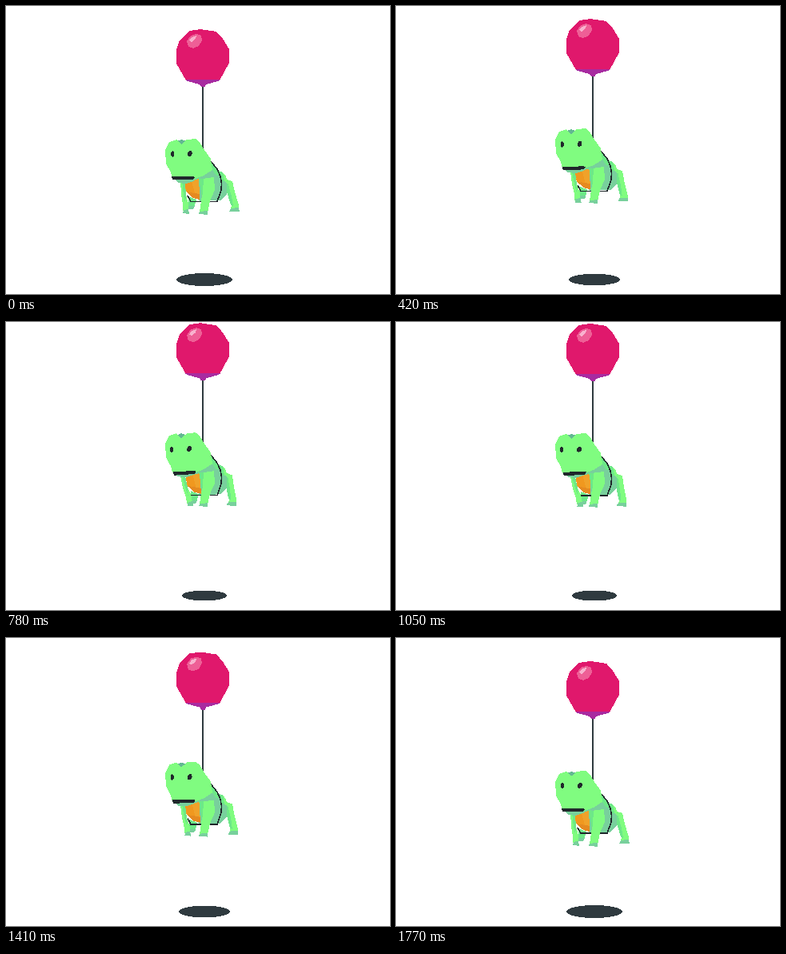
These frames come from a looping animation (480x360 px, 1.8 s). An HTML page:

```html
<!DOCTYPE html>
<html lang="en">
<head>
<meta charset="utf-8">
<title>Floating frog</title>
<style>
  html, body { margin: 0; width: 100%; height: 100%; overflow: hidden; background: #fff; }
  svg { display: block; width: 480px; height: 360px; --q: 0; }
  g, ellipse { transform-box: view-box; }

  /* --q runs from 0 (lowest) to 1 (highest) */
  .float { transform: translateY(calc(var(--q) * -29px)); }
  .shadow { transform-origin: 248px 342px; transform: scale(calc(1 - var(--q) * .207)); }
  .eyes { transform: translate(calc(var(--q) * -.9px), calc(var(--q) * 2px)); }
  .mouth { transform-origin: 221px 215px;
    transform: translate(calc(var(--q) * 2px), calc(var(--q) * 1.4px)) rotate(calc(var(--q) * -3deg)); }
  .chest { transform: translate(calc(var(--q) * 1.6px), calc(var(--q) * .5px)); }
  .fore-far { transform-origin: 222px 222px;
    transform: translateY(calc(var(--q) * -1px)) rotate(calc(var(--q) * -9deg)); }
  .fore-near { transform-origin: 250px 214px; transform: scaleY(calc(1 - var(--q) * .05)); }
  .hind-near { transform-origin: 279px 219px; transform: rotate(calc(var(--q) * 5.5deg)); }
  .hind-far { transform: translate(calc(var(--q) * 3px), calc(var(--q) * 1px)); }

  .lit { fill: #80fc80; }
  .mid { fill: #6de888; }
  .dim { fill: #78d09c; }
  .deep { fill: #62b892; }
  .ink { fill: #20282b; }
  .strap { fill: none; stroke: #20282b; stroke-width: 1.6; }
  .string { stroke: #2f3a3f; stroke-width: 2; }
</style>
</head>
<body>
<svg id="stage" viewBox="0 0 480 360" shape-rendering="crispEdges">
  <ellipse class="shadow" cx="248" cy="342" rx="35" ry="8" fill="#2f3a3f"/>
  <g class="float">
    <path class="string" d="M246 99V178"/>

    <g class="balloon">
      <path fill="#e0186c" d="M229 31L243 29 263 32 271 41 279 54 279 71 267 93 225 93 213 72 213 55 217 43Z"/>
      <path fill="#a82ba0" d="M224 92L268 92 265 94 250 98 249 101 244 101 242 98 227 94Z"/>
      <path fill="#ee5f96" d="M226 44L231 37 238 35 244 37 245 43 241 50 234 53 228 51Z"/>
      <path fill="#f8b2ce" d="M229 43L232 39 238 37 237 41 232 45Z"/>
    </g>

    <g class="hind-far">
      <path class="mid" d="M228 238L238 242 235 253 227 253Z"/>
      <path class="dim" d="M228 250L236 250 234 254 226 254Z"/>
    </g>

    <g class="hind-near">
      <path class="lit" d="M273 216L283 219 286 232 291 249 291 255 281 255 282 247 276 231Z"/>
      <path class="mid" d="M273 216L277 220 282 238 284 250 281 249 276 232Z"/>
      <path class="dim" d="M281 253L291 252 292 257 279 257Z"/>
    </g>

    <g class="body">
      <path class="dim" d="M250 190L256 194 266 206 271 208 276 217 276 235 268 243 242 244 236 236 226 230 224 218Z"/>
      <path class="mid" d="M256 194L263 202 267 212 258 211 246 211Z"/>
      <path class="mid" d="M266 206L271 208 276 217 270 220Z"/>
      <path class="lit" d="M271 208L275 213 277 222 273 219Z"/>
      <path class="strap" d="M256 194L264 204 268 213 269.5 222 269 230 264 244.3 231 244.3 227 237"/>
    </g>

    <g class="chest">
      <path fill="#f0a22a" d="M223 221L241 216 242 236 225 232Z"/>
      <path fill="#f0981f" d="M223 221L232 219 236 234 226 233Z"/>
      <path fill="#e58a20" d="M225 232L242 235 242 242 234 240Z"/>
    </g>

    <g class="fore-far">
      <path class="lit" d="M218 218L224 221 225 236 228 247 228 256 221 256 221 248 219 236Z"/>
      <path class="mid" d="M220 219L224 221 225 236 224 246 222 236Z"/>
      <path class="dim" d="M222 255L228 254 229 260 221 259Z"/>
    </g>

    <g class="fore-near">
      <path class="lit" d="M241 215L260 213 261 230 255 244 252 258 242 258 243 250 245 237Z"/>
      <path class="mid" d="M241 215L247 215 246 234 245 239Z"/>
      <path class="dim" d="M242 257L252 256 252 261 241 260Z"/>
    </g>

    <g class="head">
      <path class="deep" d="M214 169L219 167 225 169 222 175 216 174Z"/>
      <path class="dim" d="M208 214L246 211 234 219 225 222 215 221Z"/>
      <path class="dim" d="M238 214L258 205 262 211 260 214 245 216Z"/>
      <path class="lit" d="M204 170L213 167 219 173 226 167 237 166 242 170 248 180 256 191 258 205 247 212 236 216 208 216 206 208 200 197 199 180Z"/>
      <g class="eyes ink">
        <path d="M206 183L208 181 210 183 210 187 208 189 206 187Z"/>
        <path d="M227 184L229 181 232 181 233 184 232 187 229 188 227 187Z"/>
      </g>
      <path class="mouth ink" d="M207 213L234 213 236 214 234 217 208 217.5Z"/>
    </g>
  </g>
</svg>
<script>
  const LOOP = 1800, STEP = 30;
  const stage = document.getElementById("stage");

  function draw() {
    const t = Math.floor((performance.now() % LOOP) / STEP) * STEP;
    const lift = (1 - Math.cos(2 * Math.PI * t / LOOP)) / 2;
    stage.style.setProperty("--q", lift.toFixed(4));
    requestAnimationFrame(draw);
  }
  draw();
</script>
</body>
</html>
```
